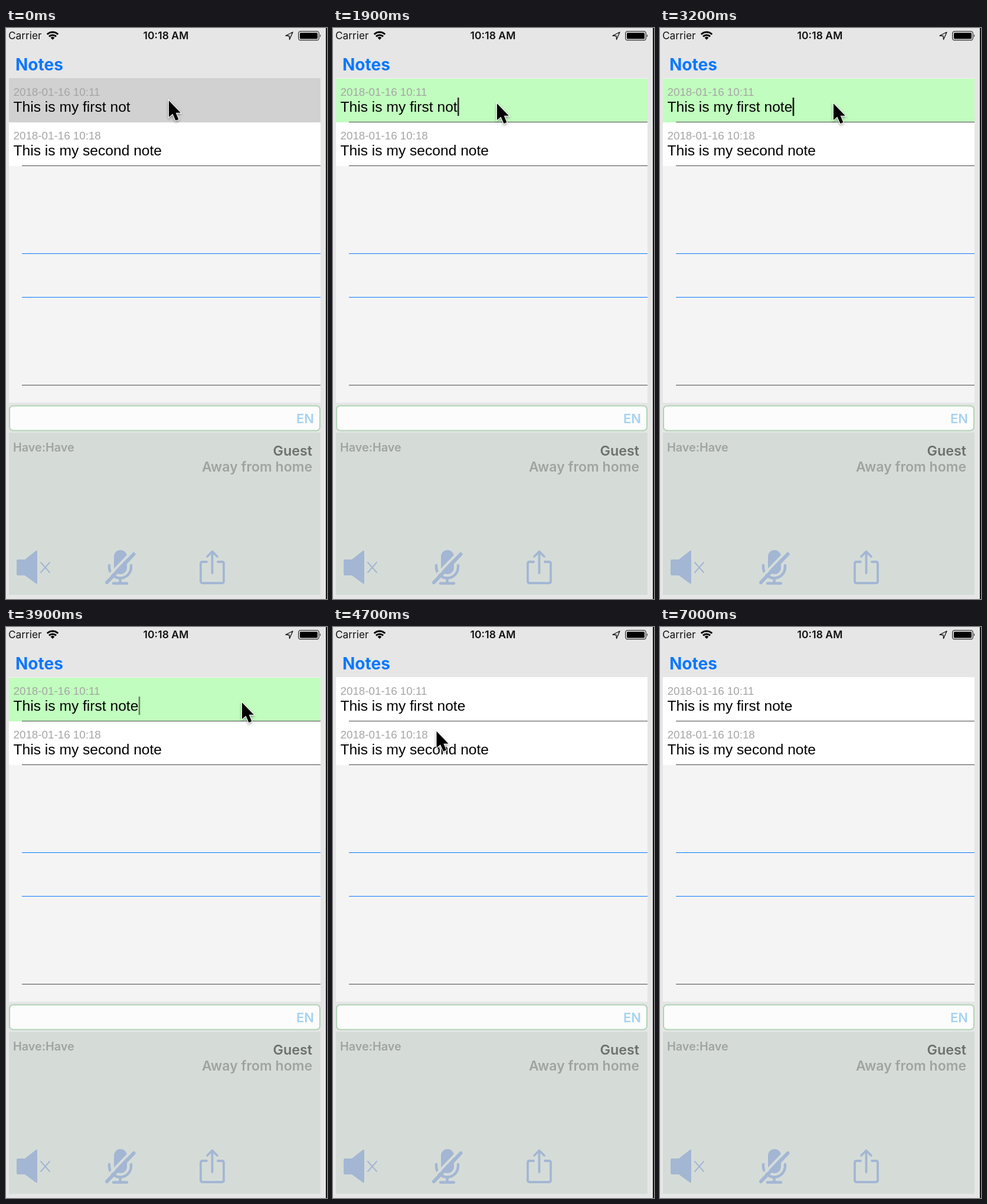
An HTML page that plays this animation: 544 px wide and 968 px high, repeating every 7.1 s.

```html
<!DOCTYPE html>
<html lang="en">
<head>
<meta charset="utf-8">
<title>Notes</title>
<style>
html, body { margin: 0; width: 100%; height: 100%; overflow: hidden; background: #e6e6e6; }
svg { display: block; width: 544px; height: 968px; }
text { font-family: Inter, Roboto, sans-serif; }
.bold { font-weight: 600; }
.date { font: 18.8px "Liberation Sans", Arial, sans-serif; fill: #a5a5a5; }
.note { font: 24.6px "Liberation Sans", Arial, sans-serif; fill: #000; }
.icon { fill: none; stroke: #a3b6d3; stroke-linecap: round; stroke-linejoin: round; }
#pointer { filter: drop-shadow(0 2px 2px rgba(0, 0, 0, .35)); }
</style>
</head>
<body>
<svg viewBox="0 0 544 968" xmlns="http://www.w3.org/2000/svg">
  <rect width="544" height="968" fill="#e6e6e6"/>

  <!-- status bar -->
  <text x="4" y="19" font-size="17.3" fill="#111">Carrier</text>
  <g fill="none" stroke="#000" stroke-width="3">
    <path d="M69.8 10.8A13 13 0 0 1 88.2 10.8"/>
    <path d="M73 14.4A8.5 8.5 0 0 1 85 14.4"/>
  </g>
  <path d="M79 20L75.6 16.4A5 5 0 0 1 82.4 16.4Z"/>
  <text class="bold" x="271" y="19" font-size="17.6" text-anchor="middle" fill="#111">10:18 AM</text>
  <path d="M486 7L474 13L480 13.5L480.5 19.5Z" fill="none" stroke="#111" stroke-width="1.3" stroke-linejoin="round"/>
  <rect x="495.7" y="5.7" width="34.6" height="15" rx="3.5" fill="none" stroke="#333" stroke-width="1.3"/>
  <rect x="498" y="8" width="30" height="10.5" rx="1.5"/>
  <path d="M532 10.5Q534.5 13.2 532 16Z" fill="#333"/>

  <text x="16" y="72" font-size="28" font-weight="650" fill="#0a78ff">Notes</text>

  <!-- list -->
  <rect x="5" y="85" width="528" height="550" fill="#f4f4f4"/>
  <rect id="row" x="5" y="85" width="528" height="75"/>
  <rect x="5" y="160" width="528" height="74" fill="#fff"/>
  <rect id="divider" x="27" y="159" width="506" height="1" fill="#4a4a4a"/>
  <rect x="27" y="233" width="506" height="1" fill="#4a4a4a"/>
  <rect x="27" y="382" width="506" height="1" fill="#0a78ff"/>
  <rect x="27" y="456" width="506" height="1" fill="#0a78ff"/>
  <rect x="27" y="605" width="506" height="1" fill="#4a4a4a"/>
  <text class="date" x="12.5" y="114.5">2018-01-16 10:11</text>
  <text class="note" x="12.5" y="141.5" id="first"></text>
  <text class="date" x="12.5" y="189">2018-01-16 10:18</text>
  <text class="note" x="12.5" y="216">This is my second note</text>
  <rect id="caret" y="118" width="2.6" height="31" fill="#111"/>

  <!-- input -->
  <rect x="6" y="640.5" width="526" height="42" rx="6" fill="#fcfcfc" stroke="#b0d4b6" stroke-width="2"/>
  <text class="bold" x="522" y="669.5" font-size="22" text-anchor="end" fill="#a5d2f1">EN</text>

  <!-- panel -->
  <rect x="5" y="686" width="528" height="275" fill="#d5dcd8"/>
  <text class="bold" x="12" y="718" font-size="19.8" fill="#a0a3a1">Have:Have</text>
  <text class="bold" x="519" y="725" font-size="23.3" text-anchor="end" fill="#6c706e">Guest</text>
  <text class="bold" x="519" y="752" font-size="23" text-anchor="end" fill="#a0a3a1">Away from home</text>

  <path d="M20 901H32L51 886Q53 885 53 888V940Q53 943 51 942L32 928H20Q18 928 18 926V903Q18 901 20 901Z" fill="#a3b6d3"/>
  <path class="icon" d="M59 906L74 923M74 906L59 923" stroke-width="2"/>

  <rect x="183" y="885" width="22" height="41" rx="11" fill="#a3b6d3"/>
  <path class="icon" d="M175 911V914A18.5 18.5 0 0 0 212 914V911M193.5 933V941M182 941.5H205" stroke-width="4.5"/>
  <path d="M166 937L215 886" stroke="#d5dcd8" stroke-width="4"/>
  <path class="icon" d="M171 940L216.500 892" stroke-width="6"/>

  <path class="icon" d="M340 905H333Q330 905 330 908V938Q330 941 333 941H366Q369 941 369 938V908Q369 905 366 905H359M349.500 924V888M341 896L349.500 887.500L358 896" stroke-width="3.8"/>

  <rect x="542" width="2" height="968" fill="#151515"/>

  <circle id="ring" r="43" fill="none" stroke="#000" stroke-width="2.8"/>
  <path id="pointer" d="M0 0V28L6.500 22.500L11.500 34L16.500 32L11.800 20.800H20Z" stroke="#fff" stroke-width="2.200" paint-order="stroke"/>
</svg>
<script>
const LOOP = 7100, STEP = 100;
const el = id => document.getElementById(id);
const [row, divider, first, caret, ring, pointer] =
  ["row", "divider", "first", "caret", "ring", "pointer"].map(el);

// time, x, y of the pointer tip
const track = [
  [0, 276, 123], [100, 280, 125], [300, 283, 127], [1600, 283, 127],
  [1800, 278, 128], [3000, 278, 128], [3200, 294, 128], [3400, 355, 128],
  [3600, 400, 128], [3900, 400, 128], [4000, 380, 127], [4200, 308, 122],
  [4400, 308, 122], [4800, 151, 187]
];

function place(t) {
  const i = track.findIndex(p => p[0] > t);
  if (i < 0) return track[track.length - 1].slice(1);
  const [a, b] = [track[i - 1], track[i]];
  const u = (t - a[0]) / (b[0] - a[0]);
  const k = u * u * (3 - 2 * u);
  return [a[1] + (b[1] - a[1]) * k, a[2] + (b[2] - a[2]) * k];
}

const within = (t, a, b) => t >= a && t < b;
const show = (node, on) => node.setAttribute("visibility", on ? "visible" : "hidden");

function caretAlpha(t) {
  if (within(t, 2500, 3300)) return 1;
  const wave = 0.5 + 0.95 * Math.cos((t - 1600) / 1000 * 2 * Math.PI);
  return t < 2500 ? Math.min(1, Math.max(0, wave + 0.65)) : Math.min(1, Math.max(0, 0.3 + wave));
}

function draw(t) {
  const editing = within(t, 1300, 4100);
  const typed = t >= 2600;
  row.setAttribute("fill", t < 1300 ? "#d1d1d1" : editing ? "#c1fdbe" : "#fff");
  row.setAttribute("y", editing ? 86 : 85);
  row.setAttribute("height", editing ? 74 : 75);
  show(divider, t >= 1300);
  first.textContent = "This is my first not" + (typed ? "e" : "");

  show(caret, within(t, 1400, 4100));
  caret.setAttribute("x", typed ? 224.7 : 211);
  caret.setAttribute("opacity", caretAlpha(t));

  const [x, y] = place(t);
  show(pointer, t < 6900);
  pointer.setAttribute("transform", `translate(${x} ${y})`);
  show(ring, within(t, 700, 900) || within(t, 4200, 4400));
  ring.setAttribute("cx", x);
  ring.setAttribute("cy", y + 2);
}

const start = performance.now();
function tick(now) {
  const t = Math.max(0, now - start) % LOOP;
  draw(Math.floor(t / STEP) * STEP);
  requestAnimationFrame(tick);
}
draw(0);
requestAnimationFrame(tick);
</script>
</body>
</html>
```
